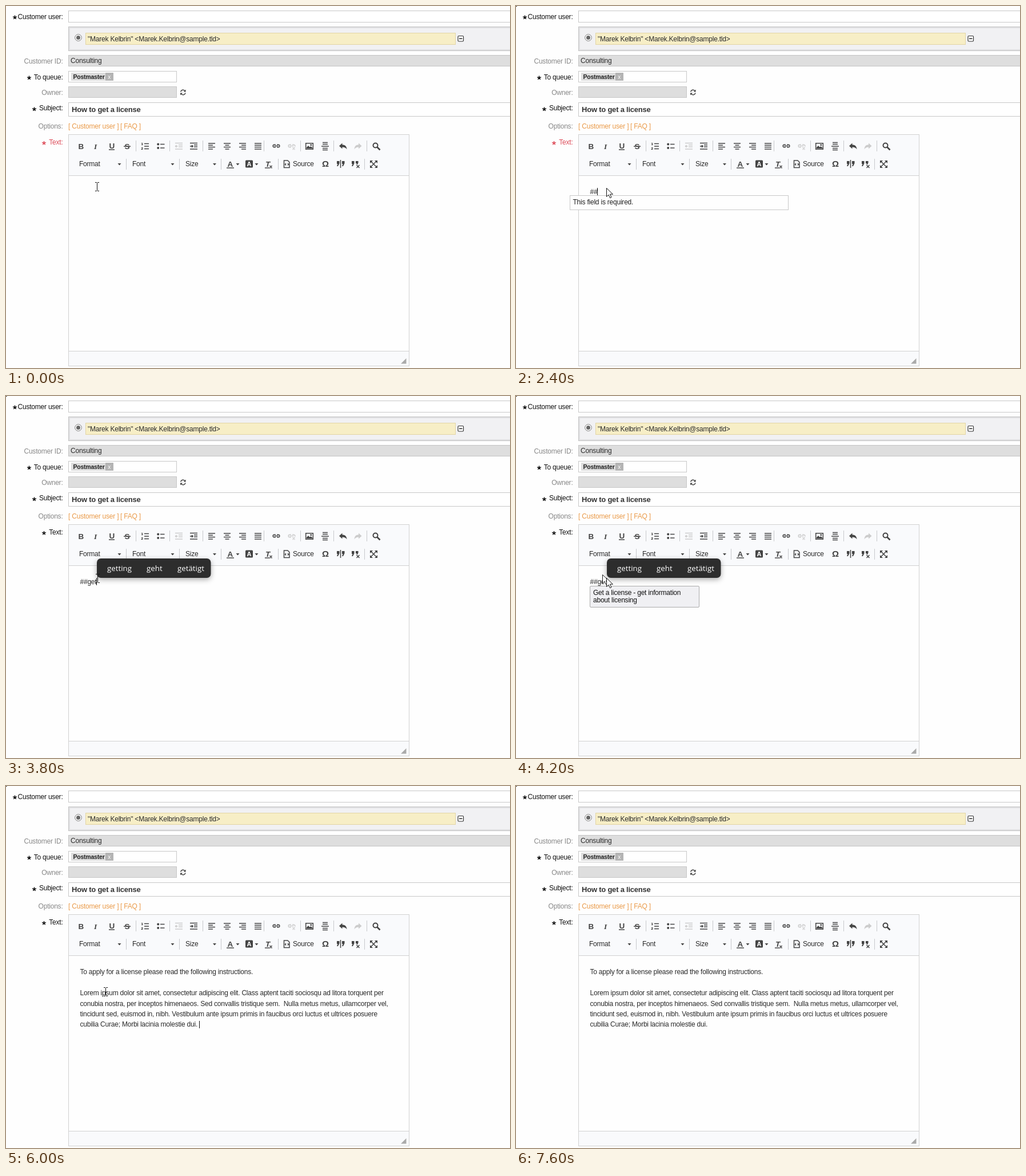
An HTML page for the animation above (7800 ms loop, 882x635 px).

```html
<!DOCTYPE html>
<html lang="en">
<head>
<meta charset="utf-8">
<title>Ticket form</title>
<style>
html, body { margin: 0; width: 100%; height: 100%; overflow: hidden; background: #fefefe; }
svg { display: block; font: 12px "Liberation Sans", Arial, sans-serif; letter-spacing: -.22px; white-space: pre; }
.icon { fill: none; stroke: #444; stroke-width: 1.5; }
.solid { fill: #444; stroke: none; }
.off { stroke: #ccc; }
.glyph { fill: #444; font-weight: bold; font-size: 13.5px; letter-spacing: 0; }
#hints { font: 13.3px "Open Sans", sans-serif; letter-spacing: 0; }
</style>
</head>
<body>
<svg id="stage" width="882" height="635" viewBox="0 0 882 635"></svg>
<script>
const LOOP = 7800;

const text = (x, y, s, attrs = 'fill="#2a2a2a"') => `<text x="${x}" y="${y}" ${attrs}>${s}</text>`;
const rect = (x, y, w, h, fill, stroke = 'none', more = '') =>
  `<rect x="${x}" y="${y}" width="${w}" height="${h}" fill="${fill}" stroke="${stroke}" ${more}/>`;
const path = (d, cls = 'icon') => `<path class="${cls}" d="${d}"/>`;
const glyph = (x, y, s, more = '') => text(x, y, s, `class="glyph" ${more}`);
const label = (y, s, fill = '#111') => text(99.5, y, s, `text-anchor="end" fill="${fill}"`);
const star = (x, y) => {
  const arms = [0, 1, 2, 3, 4].map(i => {
    const a = (i * .4 - .5) * Math.PI;
    return `M${x} ${y}l${(3.6 * Math.cos(a)).toFixed(2)} ${(3.6 * Math.sin(a)).toFixed(2)}`;
  });
  return `<path d="${arms.join('')}" stroke="currentColor" stroke-width="1.5"/>`;
};
const rows = (x, y, widths, gap = 3.3, align = 0) =>
  widths.map((w, i) => `M${x + align * (12 - w)} ${y + i * gap}h${w}`).join('');
const drop = x => path(`M${x - 3} 276h6l-3 3.5z`, 'solid');
const separators = (y, xs) =>
  `<path stroke="#c8c8cc" d="${xs.map(x => `M${x}.5 ${y}v19`).join('')}"/>`;

const form = () => [
  rect(109.5, 8.5, 800, 20, '#fff', '#c8c8c8'),
  label(23, 'Customer user:'), star(15.5, 20),
  rect(109.5, 36.5, 800, 42, '#f1f1f3', '#c4c4c4'),
  rect(111, 38, 800, 39, 'none', '#e0e0e2', 'stroke-width="2"'),
  '<circle cx="126.5" cy="55.5" r="5.8" fill="#fff" stroke="#777"/><circle cx="126.5" cy="55.5" r="3.5" fill="#666"/>',
  rect(139.5, 47.5, 647, 20, '#f7eec6', '#e3d5a4'),
  text(143, 62, '"Marek Kelbrin" &lt;Marek.Kelbrin@sample.tld&gt;'),
  rect(791, 52.5, 9.5, 9.5, '#fff', '#333', 'rx="1.5" stroke-width="1.2"'),
  '<path d="M793 57.3h5.5" stroke="#222" stroke-width="1.4"/>',
  label(101, 'Customer ID:', '#888'),
  rect(109.5, 86.5, 800, 19, '#dedede', '#c4c4c4'), text(113, 100, 'Consulting'),
  label(129, 'To queue:'), star(40.5, 126),
  rect(109.5, 114.5, 189, 19, '#fff', '#c8c8c8'),
  rect(114, 117, 60, 14, '#dcdcdc'), rect(174, 117, 14, 14, '#b4b4b4'),
  text(117.5, 128, 'Postmaster', 'fill="#222" font-weight="bold" font-size="10.5"'),
  text(178.3, 127.5, 'x', 'fill="#fff" font-size="10"'),
  label(156, 'Owner:', '#888'),
  rect(109.5, 141.5, 189, 19, '#dedede', '#c8c8c8'),
  path('M305.7 150.5a4.2 4.2 0 0 1 7.3-1.8M314 152.5a4.2 4.2 0 0 1-7.3 1.8'),
  path('M314.6 146.5v4h-4zM305 156.5v-4h4z', 'solid'),
  label(183, 'Subject:'), star(49.5, 181),
  rect(109.5, 169.5, 800, 24, '#fff', '#c8c8c8'),
  text(115, 186, 'How to get a license', 'fill="#333" font-weight="bold" font-size="13"'),
  label(215, 'Options:', '#888'),
  text(109, 215, '[ Customer user ]', 'fill="#ea9a48"'), text(200, 215, '[ FAQ ]', 'fill="#ea9a48"'),
  `<g id="textLabel">${label(243, 'Text:', 'currentColor')}${star(66.5, 240.5)}</g>`
].join('');

const editor = () => [
  rect(109.5, 225.5, 596, 406, '#fefefe', '#d1d1d1'),
  rect(110, 226, 595, 71, '#f9fafc'), rect(110, 606, 595, 25, '#f9fafc'),
  '<path d="M110 297.5h595M110 605.5h595" stroke="#d1d1d1"/>',
  '<path d="M700.5 618v9.5h-9.5z" fill="#aaa"/>',
  separators(236, [227, 286, 344, 451, 515, 573, 631]),
  separators(268, [210, 303, 376, 476, 627]),

  glyph(126.5, 250.5, 'B'),
  glyph(154, 250.5, 'I', 'font-style="italic" font-family="Liberation Serif, serif"'),
  glyph(180.5, 250, 'U'), path('M180 252h10'),
  glyph(207.5, 250.5, 'S'), path('M206 246.2h12'),
  path(rows(242, 241.5, [8, 8, 8], 4.5)),
  text(236.5, 244, '1', 'font-size="6" font-weight="bold"'), text(236.5, 251.5, '2', 'font-size="6" font-weight="bold"'),
  path(rows(270, 242.5, [7.5, 7.5], 6.5)),
  '<circle cx="266.2" cy="242.5" r="2" fill="#444"/><circle cx="266.2" cy="249" r="2" fill="#444"/>',
  path('M296 240.5h13M302 243.7h7M302 247h7M296 251h13M300.5 246h-4m2-2l-2 2 2 2', 'icon off'),
  path('M322 240.5h13M329 243.7h6M329 247h6M322 251h13M322 246h5m-2-2l2 2-2 2'),
  path(rows(354, 241, [12, 8, 12, 8])),
  path(rows(381, 241, [12, 7, 12, 7], 3.3, .5)),
  path(rows(408, 241, [12, 8, 12, 8], 3.3, 1)),
  path(rows(435, 241, [12, 12, 12, 12])),
  path('M472 243.2h-2.5a2.3 2.3 0 0 0 0 4.6h2.5M474 243.2h2.500a2.3 2.3 0 0 1 0 4.6h-2.500M469.5 245.5h7'),
  path('M499 243.2h-2.5a2.3 2.3 0 0 0 0 4.6h2.5M501 243.2h2.5a2.3 2.3 0 0 1 2 3.500M496.5 245.5h7M501.5 248l4 4m0-4l-4 4', 'icon off'),
  path('M524.7 240.7h12.6v10.6h-12.6z'),
  path('M526 250v-2l3-3 2.5 2.5 2-1.5 3 3v1zM532.5 242.5h2.5v2.5h-2.5z', 'solid'),
  path('M552 246h13M554 239.5h9M554 242.5h9M554 249.5h9M554 252.5h9'),
  path('M583 245.5l5.5-5v3c5 0 7.5 2.5 8 8-2-3-4-4-8-4v3z', 'solid'),
  '<path fill="#ccc" d="M622.5 245.5l-5.5-5v3c-5 0-7 2.5-7.5 8 2-3 4-4 7.5-4v3z"/>',
  '<circle cx="646.5" cy="244.5" r="4" class="icon" style="stroke-width:2"/><path class="icon" style="stroke-width:2.6" d="M649.5 247.5l5 5"/>',

  text(128, 281, 'Format'), text(221, 281, 'Font'), text(314, 281, 'Size'), text(502, 281, 'Source'),
  [198.5, 291.5, 365, 405.5, 438.5].map(drop).join(''),
  glyph(387.5, 281.5, 'A'), path('M386 284h13'),
  rect(419, 270.5, 13, 13, '#444', 'none', 'rx="1.5"'),
  text(421.5, 281, 'A', 'fill="#fff" font-weight="bold" font-size="11"'),
  glyph(454, 282, 'T', 'font-style="italic"'), path('M453 284h8M461.5 280l4 4.5m0-4.5l-4 4.5'),
  path('M493 271h-6.5v12.5h9.5v-9.5zM490 276l-1.5 1.7 1.5 1.7M493 276l1.5 1.7-1.5 1.7'),
  glyph(553, 282, 'Ω', 'style="font-size:15px"'),
  path('M585.5 270v14'),
  path('M579 272h4.5v4l-2.5 5h-2l1.5-4h-1.5zM588 272h4.5v4l-2.5 5h-2l1.5-4h-1.5z', 'solid'),
  path('M605 272h4.5v4l-2.5 5h-2l1.5-4h-1.5zM612 272h4.5v3l-1.5 3h-2l1-2h-2z', 'solid'),
  path('M613.5 279l5 5m0-5l-5 5'),
  path('M639 273l8.5 8.5m0-8.5l-8.5 8.5'),
  path('M637 271h5l-5 5zM650 271v5l-5-5zM637 284v-5l5 5zM650 284h-5l5-5z', 'solid')
].join('');

const article = [
  [330, 'To apply for a license please read the following instructions.'],
  [367, 'Lorem ipsum dolor sit amet, consectetur adipiscing elit. Class aptent taciti sociosqu ad litora torquent per'],
  [386, 'conubia nostra, per inceptos himenaeos. Sed convallis tristique sem.\u00a0 Nulla metus metus, ullamcorper vel,'],
  [404, 'tincidunt sed, euismod in, nibh. Vestibulum ante ipsum primis in faucibus orci luctus et ultrices posuere'],
  [422, 'cubilia Curae; Morbi lacinia molestie dui.']
];

const overlays = () => [
  `<g id="article">${article.map(([y, s]) => text(129.5, y, s)).join('')}</g>`,
  text(129.5, 330, '', 'id="typed" fill="#2a2a2a"'),
  '<rect id="caret" width="1" fill="#111"/>',
  `<g id="tooltip">${rect(94.5, 332.5, 382, 25, '#fefefe', '#c8c8c8')}${text(99.5, 348, 'This field is required.', 'fill="#222"')}</g>`,
  `<g id="menu">${rect(129.5, 333.5, 191, 37, '#f0f0f3', '#aaa', 'rx="1.5"')}
    ${text(135, 349, 'Get a license - get information', 'fill="#111"')}${text(135, 362, 'about licensing', 'fill="#111"')}</g>`,
  `<g id="hints">
    ${rect(159, 285, 199.5, 34, '#2d2d2d', 'none', 'rx="7" style="filter:drop-shadow(0 3px 5px #0005)"')}
    ${text(177, 307, 'getting', 'fill="#fff"')}${text(246, 307, 'geht', 'fill="#fff"')}${text(300, 307, 'getätigt', 'fill="#fff"')}</g>`,
  '<path id="ghost" fill="#fff" stroke="#222" transform="translate(151 313)"/>',
  '<path id="pointer" stroke="#111" stroke-linejoin="round"/>',
  '<path id="corner" d="M0 0h1.5v1h-1.5z"/>'
].join('');

const stage = document.getElementById('stage');
stage.innerHTML = form() + editor() + overlays();
const el = id => document.getElementById(id);

const shapes = {
  beam: 'M-3-7.500h2.500l1 1 1-1h2.500M.5-6.500v13M-3 7.500h2.500l1-1 1 1h2.500',
  arrow: 'M.5.5v15l3.5-3.3 2.5 5.5 2.5-1.1-2.5-5.4h5z',
  hand: 'M-1.5 13V1.5c0-2 3-2 3 0v7c.5-1.5 3-1.2 3 .5.5-1.2 2.8-1 2.8.7.5-1 2.5-.7 2.5 1v6c0 3-1 4-1.5 6h-8c-1-3-4-5-5.8-8-.8-1.5 1.3-2.7 2.5-1.3z'
};

// Each track lists [start time, ...values]; values hold until the next entry.
const pointerTrack = [
  [0, 'beam', 159, 317], [1200, 'arrow', 158, 319], [3000, 'beam', 160, 320],
  [4200, 'arrow', 158, 319], [4400, 'hand', 170, 346], [5400, 'hand', 172, 351],
  [5600, 'hand', 173, 356], [5800, 'hand', 174, 361], [6000, 'beam', 174, 361],
  [6200, 'beam', 180, 359], [6800, 'beam', 240, 345], [7200, 'beam', 350, 317],
  [7400, 'beam', 440, 285], [7600, '', 0, 0]
];
const caretTrack = [
  [0, 0], [400, 129], [800, 0], [1200, 129], [1600, 0], [2200, 136], [2400, 142],
  [2800, 149], [3400, 155], [3600, 158], [4800, 0], [5400, 158],
  [6000, 338], [6600, 0], [7000, 338], [7600, 0]
];
const typedTrack = [
  [0, ''], [2200, '#'], [2400, '##'], [2800, '##g'], [3400, '##ge'], [3600, '##get'], [6000, '']
];

const valueAt = (track, t) => track.findLast(([start]) => start <= t).slice(1);
const show = (id, visible) => el(id).style.display = visible ? '' : 'none';
const set = (id, attrs) => Object.entries(attrs).forEach(([k, v]) => el(id).setAttribute(k, v));

el('ghost').setAttribute('d', shapes.arrow);

function draw(t) {
  const [kind, x, y] = valueAt(pointerTrack, t);
  set('pointer', {
    d: shapes[kind] || '', transform: `translate(${x} ${y})`,
    fill: kind === 'beam' ? 'none' : '#fff'
  });
  const [caretX] = valueAt(caretTrack, t);
  set('caret', { x: caretX, y: t < 2200 ? 320 : t < 6000 ? 319 : 412, height: t < 2200 ? 9 : 13 });
  show('caret', caretX);
  el('typed').textContent = valueAt(typedTrack, t)[0];
  el('textLabel').style.color = t < 3000 ? '#dd4b58' : '#111';
  show('tooltip', t >= 200 && t < 3000);
  show('hints', t >= 3800 && t < 6000);
  show('menu', t >= 4200 && t < 6000);
  show('ghost', t >= 4200 && t < 4400);
  show('article', t >= 6000);
  show('corner', t >= 200);
}

const begin = performance.now();
function tick() {
  draw((performance.now() - begin) % LOOP);
  requestAnimationFrame(tick);
}
tick();
</script>
</body>
</html>
```
